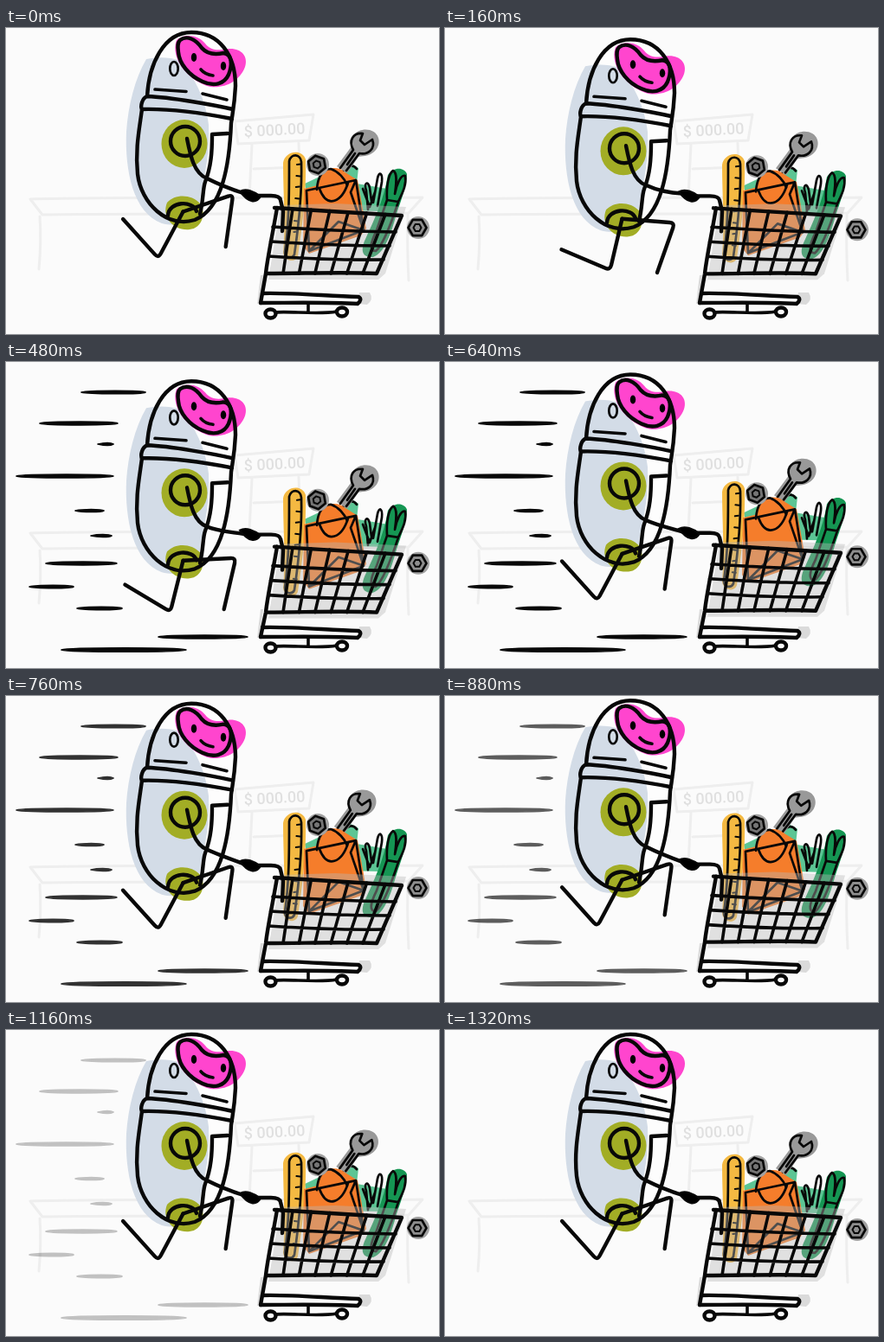
Write an HTML page that moves like this. It is 500 px wide and 354 px high and loops after 1.36 s.

```html
<!DOCTYPE html>
<html lang="en">
<head>
<meta charset="utf-8">
<title>Shopping run</title>
<style>
  html, body { margin: 0; width: 100%; height: 100%; overflow: hidden; background: #fbfbfb; }
  svg { display: block; width: 100vw; height: 100vh; }
  .ink { fill: none; stroke: #080808; stroke-width: 4.4; stroke-linecap: round; stroke-linejoin: round; }
  .mid { stroke-width: 3.6; }
  .thin { stroke-width: 2.7; }
  .fine { stroke-width: 2; }
  .back { fill: none; stroke: #eee; stroke-width: 3; stroke-linecap: round; stroke-linejoin: round; }
  .price { font: 500 18px Roboto, "Liberation Sans", sans-serif; fill: #e0e0e0; }
</style>
</head>
<body>
<svg viewBox="0 0 500 354" xmlns="http://www.w3.org/2000/svg">
  <rect width="500" height="354" fill="#fbfbfb"/>

  <g class="back">
    <path d="M28 198C120 195 390 197 481 196L465 214C330 216 150 214 42 216L28 198"/>
    <path d="M39 218Q41 245 38 279M464 216Q463 255 465 292"/>
    <path d="M264 108L355 100L350 130L268 134ZM284 135L281 195M338 133L340 194M286 163L337 161"/>
  </g>
  <text class="price" x="275" y="126" transform="rotate(-3 275 126)">$ 000.00</text>

  <g id="streaks" fill="#080808" stroke="#080808" stroke-width="1.6" stroke-linejoin="round"></g>

  <g id="body">
    <path fill="#fdfdfd" d="M163 80C165 35 180 5 215 5C250 5 266 35 265 70C264 150 257 223 200 224C157 222 146 170 158 95Z"/>
    <path fill="#d3dce7" d="M162 36C176 33 190 34 199 37C218 55 231 84 234 112C235 145 230 170 225 190C224 222 203 232 180 226C147 214 137 165 139 120C141 90 149 58 162 36Z"/>
    <path fill="#fdfdfd" d="M238 123L256 122C254 158 249 190 224 216C226 190 237 160 238 123Z"/>
    <ellipse cx="206" cy="134" rx="26.500" ry="28" fill="#a2ad25"/>
    <path fill="#a2ad25" d="M186 202C195 192 214 192 224 203C232 214 226 232 212 233C194 235 179 219 186 202Z"/>
    <path fill="#ff45ce" d="M197 14C206 6 222 8 230 18C237 27 246 26 257 24C272 23 280 33 276 45C270 61 254 70 236 68C211 62 189 35 197 14Z"/>
    <g class="ink">
      <path d="M163 79C165 42 182 5 214 5C247 5 265 32 265 67C264 88 262 96 260 110C258 158 250 209 218 222C186 232 156 203 152 169C149 140 154 117 157 94"/>
      <path d="M262 94C240 89 190 80 163 79C157 81 155 91 157 94C192 93 230 99 261 105"/>
      <path d="M256 122L238 123C238 143 237 160 230 178C227 186 228 200 224 215"/>
      <path class="mid" d="M172 71L208 73.500M227 76L255 83"/>
      <path d="M201 14C209 8 219 13 226 23C233 31 242 31 251 29C262 30 261 44 257 54C252 65 240 68 227 62C211 55 200 41 199 28C198 21 198 17 201 14Z"/>
      <path class="mid" d="M225 48Q230 54 239 55"/>
      <ellipse class="thin" cx="194" cy="47" rx="4.700" ry="8"/>
      <circle cx="207" cy="131" r="17"/>
      <path d="M187 217C188 200 216 199 220 212"/>
    </g>
    <ellipse cx="217" cy="34" rx="3.200" ry="5"/>
    <ellipse cx="251" cy="44" rx="3.200" ry="5"/>
  </g>
  <path id="legA" class="ink"/>
  <path id="legB" class="ink"/>

  <g id="goods">
    <path fill="#5cc594" d="M345 180L362 172L390 168L398 157L407 162L405 180L440 186L432 212L350 210Z"/>
    <path fill="#f4b942" d="M320 156C322 142 342 139 346 152C347 185 343 225 337 264C334 273 321 269 320 260C323 225 320 190 320 156Z"/>
    <path class="ink thin" d="M327 154C329 145 340 145 341 155C342 190 338 228 333 262C330 268 322 266 322 259C327 225 327 190 327 154Z"/>
    <path id="crust" class="ink fine"/>
    <path fill="#159653" d="M441 170C448 160 460 161 463 169C462 185 456 200 451 215C445 236 438 260 424 265C410 266 409 256 416 242C424 224 436 200 441 170Z"/>
    <g class="ink thin">
      <path d="M440 199C439 182 442 168 447 165C453 168 450 184 449 192C451 181 456 169 461 171C463 182 457 192 453 201ZM440 199L428 234Q416 258 427 258Q437 250 453 201"/>
      <path d="M418 210L416 188C413 179 418 176 420 185L422 200M424 202L429 174C431 165 435 168 434 178L429 206M412 186L420 207L426 190"/>
      <path d="M388 167Q398 154 405 163"/>
    </g>
    <g id="wrench">
      <path fill="#999" d="M382 160L399 137C395 124 408 115 420 118C434 122 433 138 424 144C418 149 411 148 407 149L394 168Z"/>
      <path class="ink thin" d="M386 162L401 141C395 130 401 121 412 122L409 130L414 135L423 129C427 140 418 147 408 145L393 165M394 158L403 145"/>
    </g>
    <path fill="#f57d2b" d="M344 186L360 182C364 158 384 160 390 166L406 176L416 232L410 240L350 261L343 252Z"/>
    <g class="ink thin">
      <path d="M347 188L404 176L413 234L350 258ZM404 176L398 190L413 234M350 258L384 224L413 234"/>
      <path d="M359 187C360 170 367 163 375 163C384 166 391 174 394 182"/>
      <path d="M362 186C371 210 388 201 395 179"/>
    </g>
    <g id="nut"></g>
  </g>

  <path fill="#dadada" d="M297 286L293 319H290L294 286ZM408 306H420Q425 314 417 320L406 319Z"/>
  <g id="basket">
    <path fill="#b7b7b7" opacity=".4" d="M317 205L380 203L462 207L438 284L430 291L303 291Z"/>
    <g class="ink">
      <path d="M310 208C355 211 410 214 457 217L428 284C390 282 345 284 301 284"/>
      <path id="grid" class="mid"/>
    </g>
  </g>
  <g id="sideNut"></g>
  <path id="post" class="ink"/>
  <g class="ink">
    <path d="M296 307C330 306 370 310 407 311Q412 314 406 319C370 317 330 318 294 318"/>
    <path class="mid" d="M311 329C325 327 360 332 382 328M349 320V329"/>
    <ellipse cx="305.500" cy="330.500" rx="6" ry="5"/>
    <ellipse cx="388" cy="328.500" rx="6" ry="5"/>
  </g>
  <path id="arm" class="ink"/>
  <path id="hand" stroke="#080808" stroke-width="2" d="M270 189C277 185 287 189 294 195C289 203 280 203 270 189Z"/>
</svg>
<script>
const LOOP = 1360, STEP = 40;
const $ = id => document.getElementById(id);
const set = (id, name, value) => $(id).setAttribute(name, value);
const move = (id, x, y) => set(id, 'transform', `translate(${x} ${y})`);
const clamp = v => Math.max(0, Math.min(1, v));
const range = n => [...Array(n).keys()];
const polar = (x, y, deg, len) =>
  [x + len * Math.cos(deg * Math.PI / 180), y + len * Math.sin(deg * Math.PI / 180)];

// Smooth curve through [time, value] pairs, without overshoot.
function curve(...keys) {
  const slope = i => (keys[i + 1][1] - keys[i][1]) / (keys[i + 1][0] - keys[i][0]);
  const tangent = keys.map((_, i) => {
    if (!i || i === keys.length - 1) return 0;
    const a = slope(i - 1), b = slope(i);
    return a * b <= 0 ? 0 : 2 * a * b / (a + b);
  });
  return t => {
    let i = 0;
    while (i < keys.length - 2 && t >= keys[i + 1][0]) i++;
    const [t0, v0] = keys[i], [t1, v1] = keys[i + 1];
    const d = t1 - t0, u = clamp((t - t0) / d), w = 1 - u;
    return w * w * (1 + 2 * u) * v0 + u * u * (3 - 2 * u) * v1 +
      d * u * w * (w * tangent[i] - u * tangent[i + 1]);
  };
}

const bodyY = curve([40, 0], [320, 21], [920, 0]);
const cartY = t => .28 * bodyY(t - 80);
const goodsY = curve([40, 0], [320, 6], [780, -9], [1320, 0]);

// Angles of thigh and shin: stretched, passing, landing, stretched.
const swing = (a, b, c, d) => curve([40, a], [320, b], [480, c], [640, d]);
const legs = {
  legA: [swing(-19, 61, 104, 118), swing(98, 145, 211, 228)],
  legB: [swing(118, 60, -3, -19), swing(228, 144, 103, 98)]
};

function leg(x, y, thigh, shin) {
  const knee = polar(x, y, thigh, 61);
  return `M${x} ${y}L${polar(...knee, thigh, -6)}Q${knee} ${polar(...knee, shin, 6)}L${polar(...knee, shin, 61)}`;
}

function nut(x, y, fill, turn) {
  const hex = r => `M${range(6).map(i => polar(x, y, turn + i * 60, r)).join('L')}Z`;
  return `<circle cx="${x + 1}" cy="${y}" r="13" fill="#a2a2a2"/>` +
    `<path class="ink thin" style="fill:${fill}" d="${hex(10.5)}"/><path class="ink fine" d="${hex(4.5)}"/>`;
}

function streak(x, y, len) {
  const h = 1.7 + len / 110, end = x + len;
  return `<path d="M${x} ${y}C${x + 8} ${y - h} ${end - 3} ${y - h} ${end} ${y}` +
    `C${end - 3} ${y + h} ${x + 8} ${y + h} ${x} ${y}Z"/>`;
}

// Left end, height and length of each speed line
$('streaks').innerHTML = [
  [87, 35, 74], [39, 71, 90], [106, 95, 18], [12, 132, 112], [80, 172, 33], [98, 201, 24],
  [46, 233, 82], [27, 260, 51], [82, 285, 52], [176, 318, 103], [64, 333, 144]
].map(s => streak(...s)).join('');

$('nut').innerHTML = nut(359, 158, '#757575', 20);
$('sideNut').innerHTML = nut(475, 231, '#8e8e8e', 0);
set('crust', 'd', range(8).map(i => `M${336 - i * .6} ${158 + i * 13}l4 ${i % 2 - .5}`).join(''));
set('grid', 'd',
  range(6).map(i => `M${331 + i * 21.4} ${209 + i * 1.3}L${320 + i * 18.4} 284`).join('') +
  range(3).map(i => `M${308 - i * 2.5} ${230 + i * 17}Q380 ${235 + i * 17} ${450 - i * 7} ${236 + i * 16}`).join(''));

function draw(t) {
  const b = bodyY(t), c = cartY(t), g = goodsY(t);
  move('body', 0, b);
  for (const id in legs) set(id, 'd', leg(204.5, 212.5 + b, ...legs[id].map(angle => angle(t))));

  move('goods', 0, g);
  move('wrench', Math.min(0, g) * .35, 0);
  move('sideNut', 0, g);
  move('basket', 0, c);
  move('hand', 0, c);
  set('arm', 'd', `M209 ${128 + b}C213 ${148 + b} 217 ${168 + b} 232 ${174 + b * .95}` +
    `C244 ${180 + b * .9} 258 ${186 + b * .6} 274 ${191 + c * 1.4}`);
  set('post', 'd', `M288 ${194 + c}L306 ${194 + c}Q316 ${194 + c} 317 ${199 + c}L320 ${212 + c}L319 ${235 + c}` +
    `M313 ${208 + c}C308 ${238 + c} 302 ${265 + c} 300 ${284 + c}L294 318`);

  const rise = clamp((t - 160) / 240), fade = clamp((1320 - t) / 680);
  set('streaks', 'opacity', rise * fade);
  move('streaks', 16 * (1 - rise), 0);
}

const start = performance.now();
function tick() {
  const t = (performance.now() - start) % LOOP;
  draw(Math.floor(t / STEP) * STEP);
  requestAnimationFrame(tick);
}
draw(0);
requestAnimationFrame(tick);
</script>
</body>
</html>
```
